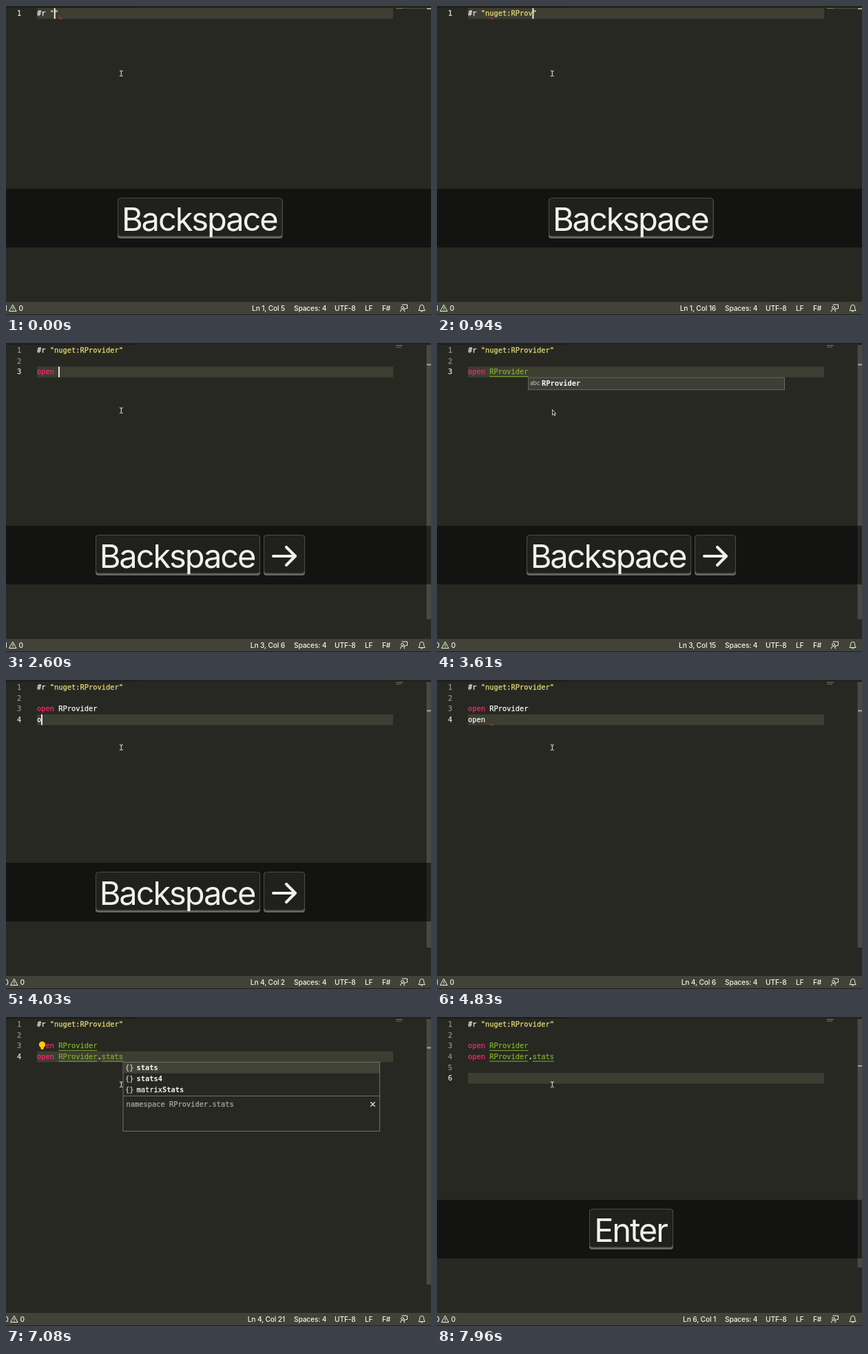
Write an HTML page that moves like this. It is 617 px wide and 448 px high and loops after 8 s.

```html
<!DOCTYPE html>
<html lang="en">
<head>
<meta charset="utf-8">
<title>Typing in an editor</title>
<style>
html, body { margin: 0; width: 100%; height: 100%; overflow: hidden; background: #272822; }
svg { display: block; width: 617px; height: 448px; }
text { white-space: pre; }
.code { font: 10.38px "DejaVu Sans Mono", monospace; stroke-width: .25px; }
.bold { font-weight: 700; stroke-width: 0; }
.abc { font: 8.5px Inter, sans-serif; fill: #c8c8c2; }
.bar { font: 500 10.2px Inter, sans-serif; letter-spacing: -.15px; fill: #f4f4ee; }
.key { font: 47px Inter, sans-serif; letter-spacing: -2.1px; fill: #f0f0ec; }
.icon { fill: none; stroke: #f0f0ea; stroke-linecap: round; stroke-linejoin: round; }
</style>
</head>
<body>
<svg id="stage" viewBox="0 0 617 448"></svg>
<script>
(() => {
const LOOP = 8000, LEFT = 45, CHAR = 6.25, ROW = 15.6, BLINK = 500;
const WHITE = '#f8f8f2', PINK = '#f92672', YELLOW = '#e6db74', LIME = '#a6e22e', GREEN = '#7fae2b';
const stage = document.getElementById('stage');

const strokes = [];
const press = (time, key) => strokes.push({ time, key });
const type = (word, start, gap) => [...word].forEach((c, i) => press(start + i * gap, c));
press(0, '');
type('nuget:RProvider', 140, 75);
press(1300, 'right');
press(2030, 'enter');
press(2100, 'enter');
type('open RProvider', 2320, 60);
press(3900, 'enter');
type('open ', 4000, 75);
type('RProvider.sta', 4910, 100);
type('ts', 6290, 140);
press(7160, '');
press(7310, 'enter');
press(7460, 'enter');

function editorAt(t) {
  const lines = ['#r "'];
  let tail = '"', last = 0;
  for (const { time, key } of strokes) {
    if (time > t) break;
    last = time;
    if (key === 'enter') lines.push('');
    else if (key === 'right') { lines[0] += tail; tail = ''; }
    else lines[lines.length - 1] += key;
  }
  const ln = lines.length, col = lines[ln - 1].length + 1;
  lines[0] += tail;
  return { lines, ln, col, lit: Math.floor((t - last) / BLINK) % 2 === 0 };
}

const within = (t, a, b) => t >= a && t < b;
const rowY = row => 3 + row * ROW;
const colX = col => LEFT + col * CHAR;
const rect = (x, y, w, h, fill, more = '') =>
  `<rect x="${x}" y="${y}" width="${w}" height="${h}" fill="${fill}" ${more}/>`;
const text = (x, y, s, cls, more = '') => `<text x="${x}" y="${y}" class="${cls}" ${more}>${s}</text>`;
const icon = (d, w = 1) => `<path class="icon" d="${d}" stroke-width="${w}"/>`;
const mono = (x, y, s, fill, cls = '') => text(x, y, s, 'code ' + cls, `fill="${fill}" stroke="${fill}"`);

function span(row, col, s, fill, underline) {
  if (!s) return '';
  const line = underline ? rect(colX(col), rowY(row) + 13.9, s.length * CHAR, 1, fill) : '';
  return mono(colX(col), rowY(row) + 11.2, s, fill) + line;
}

function squiggle(row, col) {
  const x = colX(col), y = rowY(row) + 15;
  return `<path d="M${x} ${y}q1.5-2.4 3 0t3 0" fill="none" stroke="#f23c3c" stroke-width="1"/>`;
}

function codeText(t, lines) {
  let s = span(0, 0, '#r', WHITE) + span(0, 3, lines[0].slice(3), YELLOW);
  if (t < 1600) s += squiggle(0, 5);
  if (lines[2]) {
    const known = within(t, 3300, 3900) || t >= 5500;
    s += span(2, 0, lines[2].slice(0, 4), t < 2600 ? WHITE : PINK);
    s += span(2, 5, lines[2].slice(5), known ? GREEN : WHITE, known);
  }
  if (lines[3]) {
    const name = lines[3].slice(5), fresh = t < 5100;
    s += span(3, 0, lines[3].slice(0, 4), fresh ? WHITE : PINK);
    if (t < 6700) s += span(3, 5, name, fresh ? WHITE : LIME, !fresh);
    else s += span(3, 5, 'RProvider', GREEN, true) + span(3, 14, '.', WHITE) + span(3, 15, 'stats', GREEN, true);
    if (!name && t >= 4300) s += squiggle(3, 5);
  }
  return s;
}

function gutter(ln) {
  let s = '';
  for (let i = 0; i < ln; i++)
    s += mono(16, rowY(i) + 11.2, i + 1, i === ln - 1 ? '#e4e4de' : '#90908a');
  return s;
}

function wordPopup(row) {
  const y = rowY(row) + 16;
  return rect(132.5, y, 372, 17.5, '#3d3f36', 'stroke="#6a685a"')
    + text(135, y + 11, 'abc', 'abc')
    + mono(152, y + 11.6, 'RProvider', WHITE, 'bold');
}

function memberPopup() {
  let s = rect(170, 65.5, 372.5, 100, '#272822', 'stroke="#75715e"') + rect(170.5, 66, 371.5, 15.6, '#414339');
  ['stats', 'stats4', 'matrix'].forEach((name, i) => {
    const y = 77.4 + i * ROW;
    s += mono(173, y, '{}', '#c5c5bf') + mono(189.5, y, name, WHITE, i < 2 ? 'bold' : '');
  });
  return s + mono(189.5 + 6 * CHAR, 77.4 + 2 * ROW, 'Stats', WHITE, 'bold')
    + rect(170, 114, 372.5, 1, '#75715e')
    + mono(174.5, 129.6, 'namespace RProvider.stats', '#a9a9a2')
    + icon('M529.5 123.5l6 6m0-6l-6 6', 1.1);
}

const bulb = rect(45, 35, 12.5, 13, '#272822')
  + '<circle cx="52.5" cy="40" r="4.6" fill="#ffcc00"/>'
  + rect(50.5, 43, 4, 4, '#ffcc00', 'rx="1"');

function pointer(arrow) {
  return arrow
    ? '<path d="M167.5 96.5v8l1.8-1.6 1.3 2.6 1.2-.6-1.3-2.5h2.3z" fill="#222" stroke="#eee" stroke-width=".8"/>'
    : icon('M165.3 93.8q2 0 2 1.2v5.6q0 1.2-2 1.2m4-8q-2 0-2 1.2m0 5.6q0 1.2 2 1.2');
}

function keyCap(x, w, inner) {
  return rect(x, 279, w, 58, '#666662', 'rx="4"')
    + rect(x + .5, 278.5, w - 1, 55.5, '#20201d', 'rx="4" stroke="#4c4c48"') + inner;
}

function keyLabel(x, w, s) {
  return keyCap(x, w, text(x + w / 2 - 1, 326, s, 'key', 'text-anchor="middle"'));
}

function keyBand(t) {
  if (within(t, 4690, 7160)) return '';
  let s = rect(0, 265, 617, 85, 'rgba(0,0,0,.5)');
  if (t >= 7160) s += keyLabel(221, 122, 'Enter');
  else if (t < 1300) s += keyLabel(162, 239.5, 'Backspace');
  else s += keyLabel(130, 239, 'Backspace')
    + keyCap(374, 60, icon('M388 309h32m-13-13l13 13-13 13', 4.2));
  return s;
}

function overview(ln) {
  let s = rect(611, ln === 1 ? 3 : 4 + (ln - 1) * 13.2, 6, 2, '#a5a59d');
  if (ln > 1) s = rect(610.5, 3, 6.5, 435 - ln * 12.5, '#484943') + s;
  else s += rect(566, 3, 44, 1, '#4b4c42');
  s += rect(566, 3, 10, 1, '#77765c');
  if (ln > 2) s += rect(566, 5.5, 8, 1, '#6d7248');
  return s;
}

function statusBar(errors, ln, col) {
  const x = errors ? 5 : 7;
  let s = rect(0, 429, 617, 18, '#414339') + rect(0, 447, 617, 1, '#1e1f1c')
    + text(x - 3.3, 442, errors, 'bar', 'text-anchor="end"')
    + icon(`M${x + 5} 433.5l5 9h-10zM${x + 5} 436.8v2.6m0 1.4v.2`)
    + text(x + 13.5, 442, 0, 'bar')
    + text(405, 442, `Ln ${ln}, Col ${col}`, 'bar', 'text-anchor="end"');
  [[418, 'Spaces: 4'], [477, 'UTF-8'], [521, 'LF'], [546, 'F#']].forEach(([at, label]) => {
    s += text(at, 442, label, 'bar');
  });
  return s
    + icon('M575 433h7.5v5.5h-2l-1.8 1.8v-1.8M572.5 443q0-3.5 3-3.5t3 3.5')
    + '<circle class="icon" cx="575.5" cy="437.3" r="1.9"/>'
    + icon('M599.3 441.3q1.3-1.3 1.3-4.5 0-3.5 3-3.5t3 3.5q0 3.2 1.3 4.5zM602.5 442.8q1.1 1 2.2 0');
}

function draw(t) {
  const { lines, ln, col, lit } = editorAt(t);
  const wordRow = within(t, 3300, 3700) ? 2 : within(t, 5750, 6400) ? 3 : -1;
  const errors = t < 1600 || within(t, 2380, 3320) || within(t, 4100, 6700) ? 1 : 0;
  return rect(0, 0, 617, 448, '#272822')
    + rect(0, 0, 189, 2.5, '#1e1f1b') + rect(189, 0, 428, 2, '#22231e')
    + rect(LEFT, rowY(ln - 1), 517, ROW, '#3e3d32')
    + gutter(ln) + codeText(t, lines)
    + (lit ? rect(colX(col - 1) - .2, rowY(ln - 1), 1.8, ROW, WHITE) : '')
    + (within(t, 6800, 7160) ? bulb : '')
    + pointer(wordRow >= 0)
    + (wordRow >= 0 ? wordPopup(wordRow) : '')
    + (within(t, 6700, 7160) ? memberPopup() : '')
    + overview(ln) + keyBand(t) + statusBar(errors, ln, col);
}

let shown = '';
const begin = performance.now();
function tick() {
  const picture = draw((performance.now() - begin) % LOOP);
  if (picture !== shown) stage.innerHTML = shown = picture;
  requestAnimationFrame(tick);
}
tick();
})();
</script>
</body>
</html>
```
